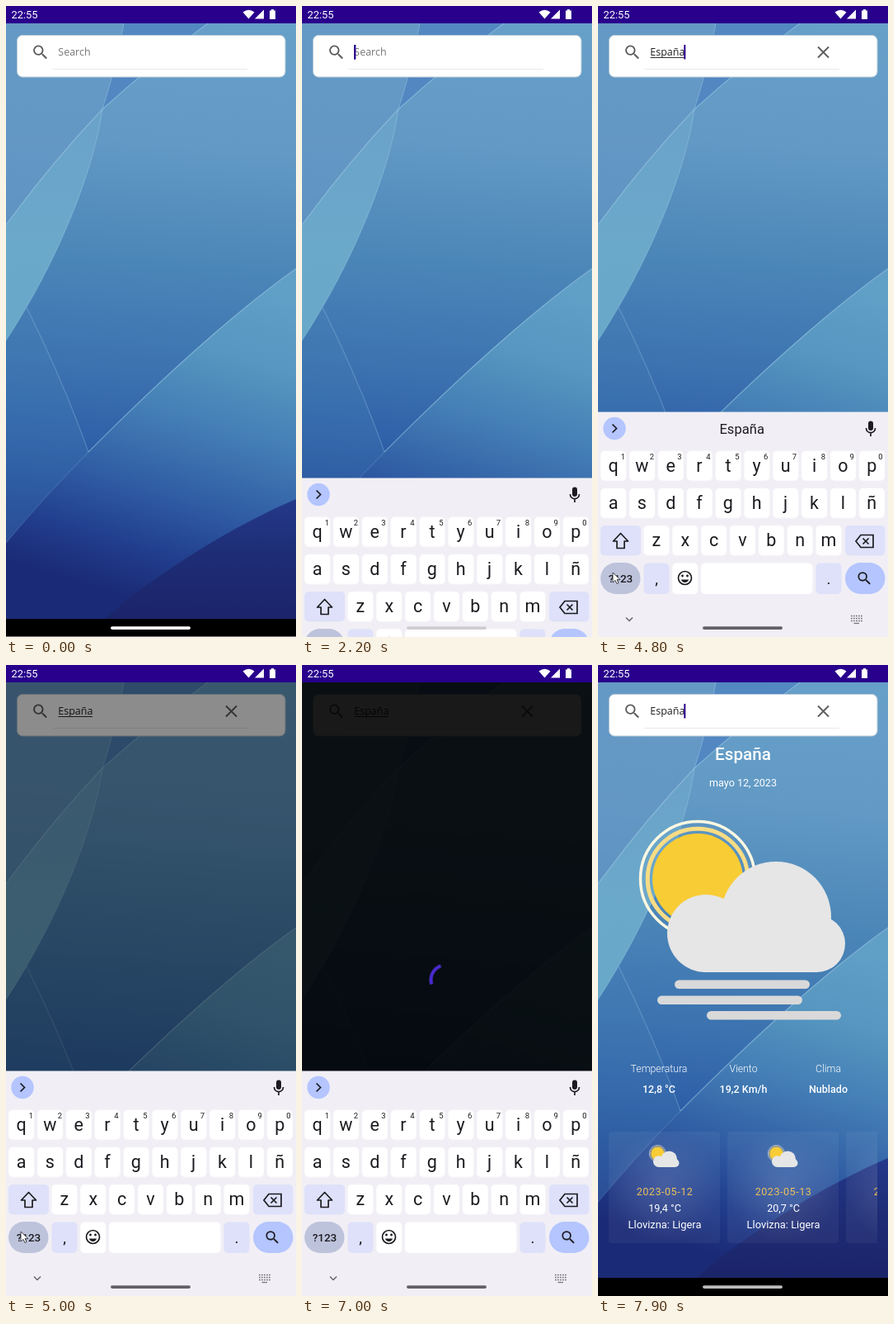
Recreate the animation shown at these times as an HTML page without scripts. Size 352 by 764 pixels, loop 8000 ms.

```html
<!DOCTYPE html>
<html lang="es">
<head>
<meta charset="utf-8">
<title>Weather search</title>
<style>
html, body { margin: 0; width: 100%; height: 100%; overflow: hidden; background: #000; }
svg { display: block; width: 352px; height: 764px; }
text { font-family: Roboto, sans-serif; }
.mid { text-anchor: middle; }
.field { font: 12.5px "Open Sans", sans-serif; }
.line { fill: none; stroke: #1c1b20; stroke-width: 1.7; }

/* every timed part shares one 8 s clock: 1.25% = 100 ms */
.t { animation: 8s step-end -.02s infinite; }
.hint { animation-name: hint; }
.typed { animation-name: typed; }
.under { animation-name: under; }
.caret { animation-name: caret; }
.blink { animation-name: blink; }
.few { animation-name: few; }
.one { animation-name: one; }
.dim { animation-name: dim; }
.load { animation-name: load; }
.result { animation-name: result; }
.rough { animation-name: rough; }
.settled { animation-name: settled; }
.board { animation-name: board; }
.base { animation-name: base; }
.glyphs { animation-name: glyphs; }
.pill { animation-name: pill; }
.mouse { animation-name: mouse; }

@keyframes hint { 0% { opacity: 1 } 30%, to { opacity: 0 } }
@keyframes typed { 0% { opacity: 0 } 30%, to { opacity: 1 } }
@keyframes under { 0% { opacity: 1 } 88.75%, to { opacity: 0 } }
@keyframes caret {
  0% { transform: translateX(63.2px) }
  30% { transform: translateX(70.3px) }
  31.25% { transform: translateX(76.3px) }
  32.5% { transform: translateX(84px) }
  35% { transform: translateX(91px) }
  36.25% { transform: translateX(97.8px) }
  37.5%, to { transform: translateX(104.3px) }
}
@keyframes blink {
  0% { opacity: 0 } 22.5% { opacity: 1 } 46.25% { opacity: 0 }
  47.5% { opacity: 1 } 62.5% { opacity: 0 } 92.5%, to { opacity: 1 }
}
@keyframes few { 0% { opacity: 0 } 35% { opacity: 1 } 41.25%, to { opacity: 0 } }
@keyframes one { 0% { opacity: 0 } 35% { opacity: 1 } 62.5%, to { opacity: 0 } }
@keyframes dim { 0% { opacity: 0 } 62.5% { opacity: .45 } 63.75% { opacity: .9 } 88.75%, to { opacity: 0 } }
@keyframes load { 0% { opacity: 0 } 63.75% { opacity: 1 } 88.75%, to { opacity: 0 } }
@keyframes result { 0% { opacity: 0 } 88.75%, to { opacity: 1 } }
@keyframes rough { 0% { opacity: 1 } 91.25%, to { opacity: 0 } }
@keyframes settled { 0% { opacity: 0 } 91.25%, to { opacity: 1 } }
@keyframes board {
  0% { transform: translateY(272px) }
  26.25% { transform: translateY(190px) }
  27.5% { transform: translateY(80px) }
  28.75% { transform: translateY(22px) }
  30% { transform: none }
  88.75% { transform: translateY(40px) }
  90% { transform: translateY(141px) }
  91.25%, to { transform: translateY(280px) }
}
@keyframes base { 0% { opacity: 1 } 88.75% { opacity: .7 } 90%, to { opacity: .17 } }
@keyframes glyphs { 0% { opacity: 1 } 88.75% { opacity: .8 } 90%, to { opacity: .5 } }
@keyframes pill {
  0% { fill: #fff } 27.5% { fill: #cfcdd3 } 35% { fill: #b3b0b7 } 38.75% { fill: #9a989e }
  41.25% { fill: #828086 } 43.75% { fill: #706f74 } 47.5% { fill: #626166 }
  90% { fill: #111 } 91.25% { fill: #777 } 92.5%, to { fill: #bcbcbc }
}
@keyframes mouse {
  0% { opacity: 0; transform: translate(-14px, 670px) }
  55% { opacity: 1; transform: translate(1px, 672px) }
  57.5% { opacity: 1; transform: translate(12px, 681px) }
  60% { opacity: 1; transform: translate(18px, 686px) }
  63.75% { opacity: 1; transform: translate(30px, 703px) }
  67.5% { opacity: 1; transform: translate(48px, 724px) }
  70% { opacity: 1; transform: translate(56px, 742px) }
  72.5%, to { opacity: 0; transform: translate(60px, 764px) }
}

/* indeterminate ring: six sweeps per clock turn */
.turn { transform-origin: 174px 381px; animation: turn 8s linear infinite; }
.arc { animation: arc 1.33333s ease-in-out -.766s infinite; }
@keyframes turn { from { transform: rotate(-172deg) } to { transform: rotate(1124deg) } }
@keyframes arc {
  0% { stroke-dasharray: 25 335; stroke-dashoffset: 0 }
  50% { stroke-dasharray: 280 80; stroke-dashoffset: -45 }
  to { stroke-dasharray: 25 335; stroke-dashoffset: -360 }
}
</style>
</head>
<body>
<svg viewBox="0 0 352 764" xmlns="http://www.w3.org/2000/svg">
  <defs>
    <linearGradient id="sky" gradientUnits="userSpaceOnUse" x1="190" y1="21" x2="130" y2="742">
      <stop offset="0" stop-color="#669fc8"/>
      <stop offset=".2" stop-color="#629ac5"/>
      <stop offset=".4" stop-color="#4b86b8"/>
      <stop offset=".58" stop-color="#3c73b0"/>
      <stop offset=".7" stop-color="#2f62a9"/>
      <stop offset=".82" stop-color="#244a98"/>
      <stop offset="1" stop-color="#1b2a78"/>
    </linearGradient>
    <linearGradient id="leaf" x1="0" y1="0" x2="0" y2="1">
      <stop offset="0" stop-color="#6aa2ca"/>
      <stop offset=".6" stop-color="#6ba9ca"/>
      <stop offset="1" stop-color="#68a8c8"/>
    </linearGradient>
    <linearGradient id="wave" gradientUnits="userSpaceOnUse" x1="330" y1="350" x2="215" y2="735">
      <stop offset="0" stop-color="#609fc6"/>
      <stop offset=".22" stop-color="#5696c0"/>
      <stop offset=".45" stop-color="#437db5"/>
      <stop offset=".68" stop-color="#2f5ba3"/>
      <stop offset=".85" stop-color="#213e8d"/>
      <stop offset="1" stop-color="#1b2a76"/>
    </linearGradient>
    <linearGradient id="deep" x1="0" y1="0" x2="0" y2="1">
      <stop offset="0" stop-color="#24398a"/>
      <stop offset=".45" stop-color="#1e2d76"/>
      <stop offset="1" stop-color="#1b2469"/>
    </linearGradient>
    <radialGradient id="glow">
      <stop offset="0" stop-color="#fff" stop-opacity=".17"/>
      <stop offset="1" stop-color="#fff" stop-opacity=".05"/>
    </radialGradient>
    <pattern id="keys" width="34.85" height="45.2" patternUnits="userSpaceOnUse">
      <rect x="1.9" y="4.7" width="31" height="36" rx="5" fill="#fff"/>
    </pattern>
    <clipPath id="list"><path d="M13 560H339V705H13Z"/></clipPath>
    <clipPath id="cut"><path d="M15.500 176H300V400H15.500Z"/></clipPath>
    <clipPath id="cutBar"><path d="M15.500 151H300V400H15.500Z"/></clipPath>

    <g id="sun" fill="none">
      <circle cx="121" cy="259" r="69.500" stroke="#fff8e2" stroke-width="3.500"/>
      <circle cx="121" cy="259" r="60.800" stroke="#f8dc84" stroke-width="5"/>
      <circle cx="121" cy="259" r="55" fill="#f8cc34"/>
    </g>
    <g id="cloud" fill="#e6e6e6">
      <circle cx="131" cy="325" r="47"/>
      <circle cx="216" cy="305" r="67"/>
      <circle cx="265.500" cy="337.500" r="34.500"/>
      <path d="M131 300H265V372H131Z"/>
    </g>
    <g id="card">
      <rect x="13" y="565" width="135" height="135" rx="4" fill="url(#glow)"/>
      <g transform="translate(54.700 553.700) scale(.146)"><use href="#sun"/><use href="#cloud"/></g>
    </g>
    <path id="lens" d="M15.500 14h-.79l-.28-.27A6.470 6.470 0 0 0 16 9.500 6.500 6.500 0 1 0 9.500 16c1.610 0 3.090-.59 4.230-1.570l.27.28v.79l5 4.990L20.490 19zm-6 0a4.500 4.500 0 1 1 0-9 4.500 4.500 0 0 1 0 9z"/>
  </defs>

  <!-- wallpaper -->
  <rect y="21" width="352" height="721" fill="url(#sky)"/>
  <path d="M0 21H143Q135 70 117 125Q55 190 0 265Z" fill="#6598c5" opacity=".7"/>
  <path d="M143 21H245Q180 68 117 125Q135 70 143 21Z" fill="#4c80bf" opacity=".75"/>
  <path d="M0 265Q55 190 117 125C105 205 62 310 0 405Z" fill="url(#leaf)"/>
  <path d="M25 365Q70 455 100 540Q40 600 0 650V405Z" fill="#4a86b8" opacity=".22"/>
  <path d="M352 318C270 376 185 455 100 540Q45 596 0 650V742H352Z" fill="url(#wave)"/>
  <path d="M352 597C280 628 215 668 150 716L120 742H352Z" fill="url(#deep)"/>
  <g fill="none" stroke="#a5d0ea" stroke-width="1.200">
    <path d="M0 265Q55 190 117 125Q180 68 245 21" opacity=".5"/>
    <path d="M143 21Q135 70 117 125C105 205 62 310 0 405" opacity=".35"/>
    <path d="M25 365Q70 455 100 540" opacity=".3"/>
    <path d="M352 318C270 376 185 455 100 540" opacity=".5"/>
    <path d="M100 540Q45 596 0 650" opacity=".17"/>
  </g>

  <!-- search card -->
  <rect x="13.500" y="35.500" width="325.500" height="50.500" rx="6.500" fill="#fff" stroke="#b9cbd9"/>
  <path d="M56 76.500H293" stroke="#e9e9e9"/>
  <use href="#lens" transform="translate(30.200 44.500) scale(.96)" fill="#5c5c5c"/>
  <g class="t typed">
    <text class="field" x="63.300" y="60.300" fill="#1f1f1f">España</text>
    <path class="t under" d="M63.500 62.500H105" stroke="#333"/>
    <path d="M267 49.500L280 62.500M280 49.500L267 62.500" stroke="#5c5c5c" stroke-width="1.900"/>
  </g>
  <g class="t caret">
    <rect x="1" y="46" width="46" height="20" fill="#fff"/>
    <rect class="t blink" y="47" width="2" height="17.500" fill="#28008c"/>
  </g>
  <text class="field t hint" x="63.300" y="60.300" fill="#767676">Search</text>
  <rect class="t blink" x="63.200" y="47" width="2" height="17.500" fill="#28008c" style="animation-name:first"/>
  <style>@keyframes first { 0% { opacity: 0 } 22.5% { opacity: 1 } 30%, to { opacity: 0 } }</style>

  <!-- forecast -->
  <g class="t result" fill="#fff">
    <g class="mid" font-size="12.600">
      <text x="176" y="115" font-size="20.700" font-weight="500">España</text>
      <text x="176" y="146.500">mayo 12, 2023</text>
      <g font-weight="300" font-size="12.300">
        <text x="74" y="493">Temperatura</text>
        <text x="176.500" y="493">Viento</text>
        <text x="279.500" y="493">Clima</text>
      </g>
      <g font-weight="500" font-size="12.500">
        <text x="74" y="517.500">12,8 °C</text>
        <text x="176.500" y="517.500">19,2 Km/h</text>
        <text x="279.500" y="517.500">Nublado</text>
      </g>
    </g>
    <g class="t rough">
      <g clip-path="url(#cutBar)"><rect x="-60" y="146" width="164" height="10" rx="5" fill="#d9d9d9"/></g>
      <g clip-path="url(#cut)"><use href="#sun" x="-109.500" y="-87"/></g>
      <use href="#cloud" transform="translate(-66.700 -82) scale(.975)"/>
    </g>
    <g class="t settled">
      <use href="#sun"/>
      <use href="#cloud"/>
      <g fill="#d9d9d9">
        <rect x="93" y="381.500" width="164" height="10.500" rx="5.200"/>
        <rect x="72" y="400.500" width="176" height="10.500" rx="5.200"/>
        <rect x="132" y="419" width="163" height="10.500" rx="5.200"/>
      </g>
    </g>
    <g clip-path="url(#list)" class="mid" font-size="12.600">
      <use href="#card"/>
      <use href="#card" x="144"/>
      <use href="#card" x="288"/>
      <g fill="#ebc05c" letter-spacing=".5">
        <text x="81" y="642">2023-05-12</text>
        <text x="225" y="642">2023-05-13</text>
        <text x="369" y="642">2023-05-14</text>
      </g>
      <text x="81" y="662">19,4 °C</text>
      <text x="225" y="662">20,7 °C</text>
      <text x="81" y="682" font-size="12.900">Llovizna: Ligera</text>
      <text x="225" y="682" font-size="12.900">Llovizna: Ligera</text>
    </g>
  </g>

  <!-- loading -->
  <rect class="t dim" y="21" width="352" height="721"/>
  <g class="t load"><g class="turn">
    <circle class="arc" cx="174" cy="381" r="17.500" pathLength="360" fill="none" stroke="#4a2bd0" stroke-width="4"/>
  </g></g>

  <rect y="742" width="352" height="22"/>

  <!-- keyboard -->
  <g class="t board">
    <g class="t base">
      <rect y="491.500" width="352" height="300" fill="#f1eff5"/>
      <circle cx="20" cy="511.500" r="13.700" fill="#b4c5ff"/>
      <g fill="url(#keys)">
        <path transform="translate(1.300 534)" d="M0 0H348.500V90.400H0Z"/>
        <path transform="translate(53.500 624.400)" d="M0 0H243.950V45.200H0Z"/>
      </g>
      <g fill="#dee1f9">
        <rect x="3" y="629" width="49" height="36.500" rx="5"/>
        <rect x="300" y="629" width="48.500" height="36.500" rx="5"/>
        <rect x="55.500" y="674.500" width="31" height="37.500" rx="5"/>
        <rect x="264.500" y="674.500" width="31" height="37.500" rx="5"/>
      </g>
      <g fill="#fff">
        <rect x="90.300" y="674.500" width="31" height="37.500" rx="5"/>
        <rect x="125" y="674.500" width="135.500" height="37.500" rx="5"/>
      </g>
      <rect x="3" y="674" width="48.500" height="38" rx="19" fill="#bec3dc"/>
      <rect x="300" y="674" width="48.500" height="38" rx="19" fill="#b4c5ff"/>
    </g>
    <g class="t glyphs" fill="#1c1b20">
      <g class="mid" font-size="21.500">
        <text y="563.500" x="18.500 53.400 88.200 123 157.900 192.700 227.600 262.500 297.300 332.200">qwertyuiop</text>
        <text y="608.500" x="18.500 53.400 88.200 123 157.900 192.700 227.600 262.500 297.300 332.200">asdfghjklñ</text>
        <text y="654" x="70.900 105.800 140.600 175.500 210.300 245.200 280">zxcvbnm</text>
        <text y="700" x="71 280" font-size="19">,.</text>
        <text y="549" x="30.500 65.400 99 134 168.900 203.700 238.500 273.400 308.200 343" font-size="9.500">1234567890</text>
        <text x="27.500" y="698" font-size="13.500" font-weight="500">?123</text>
      </g>
      <g class="mid" font-size="16.600">
        <g class="t few">
          <text x="82" y="518">Espa</text>
          <text x="267" y="518">Español</text>
          <path d="M125.500 501V522M223.500 501V522" stroke="#cfcdd4"/>
        </g>
        <text class="t one" x="174.700" y="518">España</text>
      </g>
      <path class="line" d="M17.500 506.500L22.500 511.500L17.500 516.500" stroke-width="2"/>
      <rect x="328" y="502.500" width="6" height="11.500" rx="3"/>
      <path class="line" d="M325.500 511C325.500 518.500 336.500 518.500 336.500 511M331 516.500V521"/>
      <path class="line" d="M27.500 638.500L36.500 648H32V656.500H23V648H18.500Z" stroke-linejoin="round"/>
      <path class="line" d="M319 640.500H334V655.500H319L313 648ZM321.500 644.500L328.500 651.500M328.500 644.500L321.500 651.500"/>
      <circle class="line" cx="105.500" cy="692.500" r="8"/>
      <circle cx="102.500" cy="690" r="1.400"/>
      <circle cx="108.500" cy="690" r="1.400"/>
      <path d="M101 694.500H110C109 699 102 699 101 694.500Z"/>
      <use href="#lens" transform="translate(312.800 682.500) scale(.88)"/>
      <path class="line" d="M34 740.500L38 744.500L42 740.500" style="stroke:#67666c;stroke-width:1.500"/>
      <path d="M307 738.500H321M307 741.500H321M307 744.500H321" stroke="#77767c" stroke-width="1.700" stroke-dasharray="1.800 1.200"/>
      <path d="M310.500 747.500H317" stroke="#77767c" stroke-width="1.300"/>
    </g>
  </g>
  <rect class="t pill" x="127" y="751.300" width="97" height="3.600" rx="1.800"/>

  <g class="t mouse">
    <path d="M0 0V12L3 9.400L5 13.500L7 12.500L5.100 8.600H9Z" fill="#fff" stroke="#222" stroke-width=".8"/>
  </g>

  <!-- status bar -->
  <rect width="352" height="21" fill="#28008c"/>
  <g fill="#fff">
    <text x="6.500" y="15.200" font-size="12.900">22:55</text>
    <path d="M287.500 7.500Q294.500 2 301.500 7.500L294.500 15.500Z"/>
    <path d="M313 4.500V15.500H302Z"/>
    <path d="M320 5.500H322V4H325V5.500H327V16H320Z"/>
  </g>
</svg>
</body>
</html>
```
